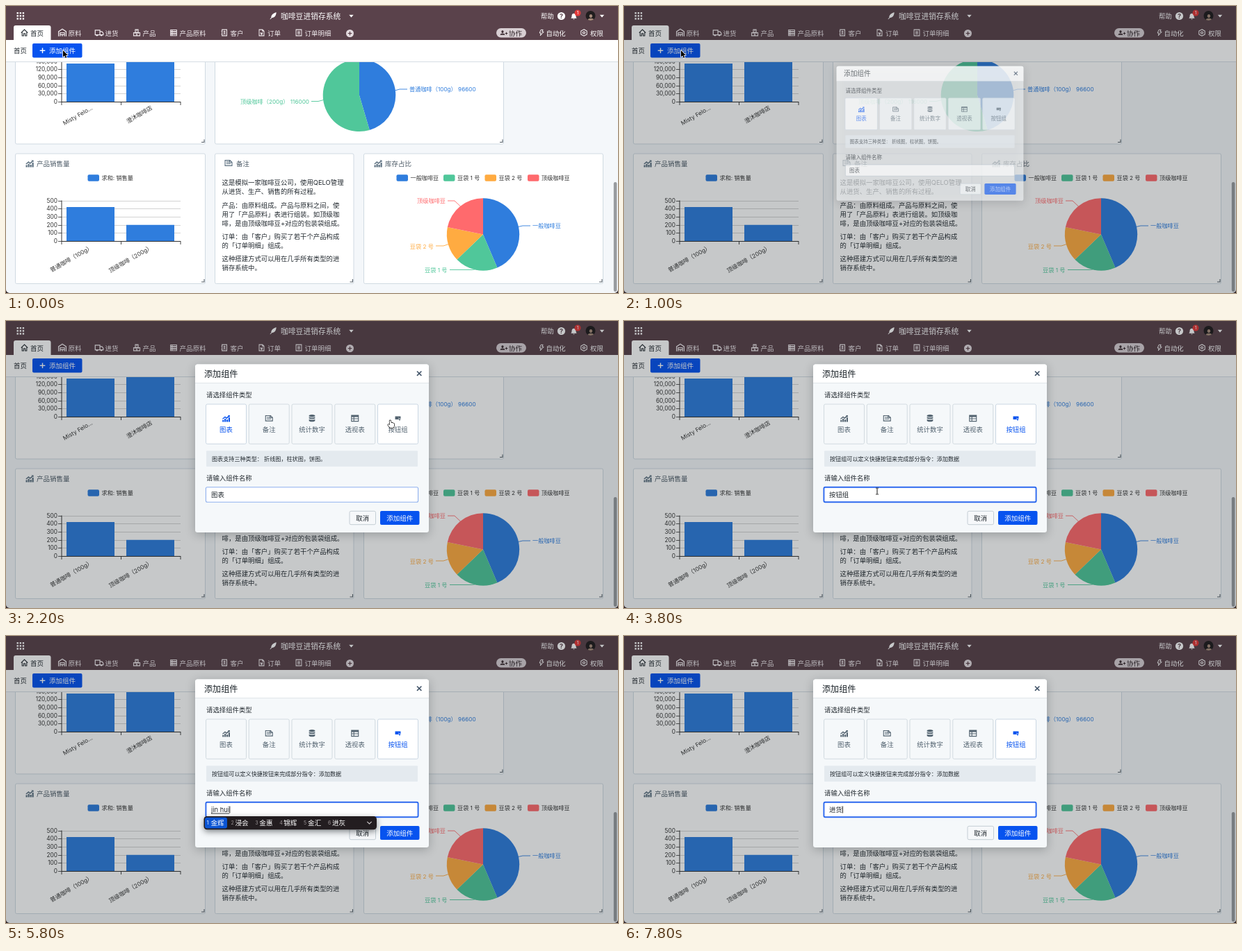
Recreate the animation shown at these times as an HTML page with a canvas. Size 880 by 414 pixels, loop 8000 ms.

```html
<!DOCTYPE html>
<html lang="zh-CN">
<head>
<meta charset="utf-8">
<title>添加组件</title>
<style>
html, body { margin: 0; width: 100%; height: 100%; overflow: hidden; background: #f4f7fa; }
canvas { display: block; width: 880px; height: 414px; }
</style>
</head>
<body>
<canvas id="stage"></canvas>
<script>
const W = 880, H = 414, LOOP = 8000, STEP = 200;
const canvas = document.getElementById('stage');
const c = canvas.getContext('2d');
const dpr = window.devicePixelRatio || 1;
canvas.width = W * dpr;
canvas.height = H * dpr;

const FONT = 'Inter, "Noto Sans CJK SC", "Noto Sans CJK", sans-serif';
const BLUE = '#2f7ddd', GREEN = '#50c79a', ORANGE = '#ffab41', RED = '#ff6a6d';
const PRIMARY = '#0753ef', INK = '#22292f', GRAY = '#5c7080', LINE = '#d0dae2';

// Icons live on a 12 x 12 grid.
const ICON = {
  home: 'M.8 6.2 6 1.2 11.2 6.2M2.4 5.2V11H4.8V7.4H7.2V11H9.6V5.2',
  store: 'M.8 11V4.5L6 1 11.2 4.5V11M3 11V6H9V11M3 8.5H9M6 8.5V11',
  truck: 'M.5 2.5H7V9H.5ZM7 4.5H9.8L11.6 6.6V9H7M2 9.2A1 1 0 1 0 4 9.2M8 9.2A1 1 0 1 0 10 9.2',
  boxes: 'M3.6 1H8.4V5.4H3.6ZM.8 6H5.8V11H.8ZM6.2 6H11.2V11H6.2ZM6 1V3M3.3 6V8M8.7 6V8',
  rows: 'M1 1.5H11V4H1ZM1 4.9H11V7.4H1ZM1 8.3H11V10.8H1ZM3.5 1.5V10.8',
  contact: 'M2.2 1H10V11H2.2ZM1 3.5H3M1 8.5H3M4.5 8.8Q6.2 6 7.9 8.8M5 4.6A1.2 1.2 0 1 0 7.4 4.6A1.2 1.2 0 1 0 5 4.6',
  order: 'M2 1H7.5L10 3.5V11H2ZM7.5 1V3.5H10M4 5.5 6 7.2 8 5.5M6 7V9.8M4 8H8',
  list: 'M1.5 1H10.5V11H1.5ZM3.8 4H8.2M3.8 6H8.2M3.8 8H8.2',
  bolt: 'M5 1H8.6L6.8 4.6H9.8L4 11 5.2 6.6H2.6Z',
  gear: 'M6 .6 10.8 3.3V8.7L6 11.4 1.2 8.7V3.3ZM4.2 6A1.8 1.8 0 1 0 7.8 6A1.8 1.8 0 1 0 4.2 6',
  leaf: 'M1 11.4 3.2 8.6C2.7 5.8 5.6 2.2 11 .6 11.2 4.8 8.8 9.2 4.3 9.4L1.7 11.8Z',
  bell: 'M1.5 9Q2.8 8 2.8 5Q2.8 1.8 6 1.4Q9.2 1.8 9.2 5Q9.2 8 10.5 9ZM4.6 9.8H7.4Q6 12 4.6 9.8Z',
  person: 'M6 1A2.4 2.8 0 1 1 5.9 1ZM1 11Q1 7.4 6 7.4Q11 7.4 11 11Z',
  chart: 'M.5 11.5V8.5H2.7V11.5ZM3.5 11.5V6.8H5.7V11.5ZM6.5 11.5V8H8.7V11.5ZM9.5 11.5V5H11.7V11.5ZM.4 6.4 4.4 3 6.7 5 9.4 2.4 8.4 1.4H11.6V4.5L10.5 3.5 6.8 7 4.4 4.9 1.2 7.5Z',
  note: 'M.8 2H8.2L11.2 5V10H.8ZM2.6 4.6H7M2.6 7H9M7.6 2V5.2H11',
  stack: 'M1.5 1.5Q6-.5 10.5 1.5V3Q6 5 1.5 3ZM1.5 4.2Q6 6 10.5 4.2V6.2Q6 8 1.5 6.2ZM1.5 7.4Q6 9.2 10.5 7.4V10Q6 12.5 1.5 10Z',
  table: 'M.8 1.5H11.2V10.5H.8ZM.8 2.5H11.2M.8 3.5H11.2M.8 6.8H11.2M4.4 4V10.5',
  button: 'M1 2.5H11V7.6L7 5 7.6 8H1ZM7.6 5.8 11.3 9.2 9.5 9.4 8.4 10.8Z'
};
for (const key in ICON) ICON[key] = new Path2D(ICON[key]);

function text(s, x, y, size, color = INK, align = 'left', weight = 400) {
  c.font = `${weight} ${size}px ${FONT}`;
  c.textAlign = align;
  c.fillStyle = color;
  c.fillText(s, x, y + size * 0.375);
}
function rect(x, y, w, h, fill, r = 0, stroke, lw = 1) {
  c.beginPath();
  c.roundRect(x, y, w, h, r);
  if (fill) { c.fillStyle = fill; c.fill(); }
  if (stroke) { c.strokeStyle = stroke; c.lineWidth = lw; c.stroke(); }
}
function floating(blur, alpha, ...box) {
  c.save();
  c.shadowColor = `rgba(16,22,26,${alpha})`;
  c.shadowBlur = blur * dpr;
  c.shadowOffsetY = 3 * dpr;
  rect(...box);
  c.restore();
}
function circle(x, y, r, fill) {
  c.beginPath();
  c.arc(x, y, r, 0, Math.PI * 2);
  c.fillStyle = fill;
  c.fill();
}
function line(points, color, lw = 1) {
  c.beginPath();
  for (let i = 0; i < points.length; i += 2) c.lineTo(points[i], points[i + 1]);
  c.strokeStyle = color;
  c.lineWidth = lw;
  c.stroke();
}
function icon(name, x, y, size, color, solid) {
  c.save();
  c.translate(x - size / 2, y - size / 2);
  c.scale(size / 12, size / 12);
  if (solid) { c.fillStyle = color; c.fill(ICON[name]); }
  else { c.strokeStyle = color; c.lineWidth = 1.15; c.stroke(ICON[name]); }
  c.restore();
}
function triangle(x, y, color) {
  c.beginPath();
  c.moveTo(x - 3.2, y - 1.7); c.lineTo(x + 3.2, y - 1.7); c.lineTo(x, y + 2);
  c.fillStyle = color;
  c.fill();
}
function plus(x, y, r, color, lw = 1.4) {
  line([x - r, y, x + r, y], color, lw);
  line([x, y - r, x, y + r], color, lw);
}

function header() {
  rect(0, 0, W, 49, '#5a424b');
  const pale = '#f1ebee';
  for (let i = 0; i < 9; i++) rect(15.5 + i % 3 * 4.1, 9 + Math.floor(i / 3) * 4.1, 2.4, 2.4, '#fff');
  icon('leaf', 384, 14, 11, '#fff', true);
  text('咖啡豆进销存系统', 395, 14.5, 10.8, '#fff');
  triangle(496.5, 14.5, '#fff');
  text('帮助', 769, 14.5, 9.4, '#fff');
  circle(798.5, 14.5, 5.6, '#fff');
  text('?', 798.5, 14.6, 9, '#5a424b', 'center', 700);
  icon('bell', 816.5, 15, 11, '#fff', true);
  circle(822, 10, 4.5, '#e23a3a');
  text('1', 822, 10, 6.5, '#fff', 'center');
  circle(840.5, 14, 7, '#201d1e');
  c.save();
  c.beginPath();
  c.arc(840.5, 14, 7, 0, 7);
  c.clip();
  icon('person', 841, 16.5, 11, '#a58a7a', true);
  c.restore();
  triangle(857, 14.5, '#fff');

  rect(11, 28, 53.5, 22, '#fff', [3, 3, 0, 0]);
  icon('home', 26.5, 38.5, 11, INK);
  text('首页', 35, 39, 9.5);
  const tabs = [['store', 81, '原料'], ['truck', 134, '进货'], ['boxes', 188, '产品'], ['rows', 241, '产品原料'],
    ['contact', 314, '客户'], ['order', 367.5, '订单'], ['list', 421, '订单明细']];
  for (const [name, x, label] of tabs) {
    icon(name, x, 38.5, name === 'store' || name === 'truck' ? 12.5 : 10.5, pale);
    text(label, x + 8.5, 39, 9.5, pale);
  }
  circle(494.5, 39.5, 5.5, '#e4dce0');
  plus(494.5, 39.5, 2.8, '#5a424b', 1.2);
  rect(705, 32, 43, 13.5, '#d8cfd3', 6.7);
  icon('person', 714, 38.5, 8, '#3b2c32', true);
  plus(719.5, 39.5, 1.8, '#3b2c32', 1);
  text('协作', 723, 39, 9.5, '#33282d');
  icon('bolt', 770, 38.5, 10, '#fff');
  text('自动化', 776.5, 39, 9.4, '#fff');
  icon('gear', 831, 38.5, 10.5, '#fff');
  text('权限', 840, 39, 9.4, '#fff');
}

function toolbar(color) {
  rect(0, 49, W, 31, '#fff');
  rect(0, 80, W, 1, '#d5dde4');
  text('首页', 11, 64.5, 9.4);
  rect(38, 54, 71.5, 20.5, color, 2);
  plus(52.5, 64.3, 3.8, '#fff');
  text('添加组件', 62, 64.5, 9.5, '#fff');
}

function panel(x, y, w, h) {
  rect(x + 0.5, y + 0.5, w - 1, h - 1, '#fff', 2, LINE);
  const r = x + w - 2, b = y + h - 3;
  line([r - 4, b, r, b, r, b - 4], '#56606a', 1.1);
}

function bars(base, gap, labels, tops, names) {
  labels.forEach((s, i) => {
    const y = Math.round(base - i * gap) + 0.5;
    text(s, 74, y - 0.3, 8.3, '#333', 'right');
    line([75, y, 80, y], '#333', 0.8);
    if (i) line([80, y, 251, y], '#c8c8c8', 0.8);
  });
  [87, 173].forEach((x, i) => rect(x, tops[i], 69, base - tops[i], BLUE));
  line([80, base + 0.5, 251, base + 0.5], '#333', 1);
  line([80, base - gap * (labels.length - 1), 80, base], '#333', 1);
  [80, 165.5, 251].forEach(x => line([x, base, x, base + 5], '#333', 0.9));
  names.forEach((s, i) => {
    c.save();
    c.translate(123.5 + i * 86, base + 8);
    c.rotate(-Math.PI / 6);
    text(s, 0, 0, 8.3, '#333', 'right');
    c.restore();
  });
}

// Each slice: [end angle in degrees clockwise from the top, colour].
function pie(x, y, r, slices) {
  let from = 0;
  for (const [to, color] of slices) {
    c.beginPath();
    c.moveTo(x, y);
    c.arc(x, y, r, (from - 90) * Math.PI / 180, (to - 90) * Math.PI / 180);
    c.fillStyle = color;
    c.fill();
    from = to;
  }
}
function callout(s, x, y, color, align, points) {
  line(points, color, 0.9);
  text(s, x, y, 8.2, color, align);
}
function legend(s, x, y, color) {
  rect(x, y - 4.8, 16.5, 9.6, color, 2);
  text(s, x + 20, y + 0.3, 8.15, '#333');
}

const NOTES = [
  [254.5, '这是模拟一家咖啡豆公司，使用QELO管理'],
  [267.5, '从进货、生产、销售的所有过程。'],
  [287, '产品：由原料组成。产品与原料之间，使'],
  [300, '用了「产品原料」表进行组装。如顶级咖'],
  [313, '啡，是由顶级咖啡豆+对应的包装袋组成。'],
  [332, '订单：由「客户」购买了若干个产品构成'],
  [345, '的「订单明细」组成。'],
  [364.5, '这种搭建方式可以用在几乎所有类型的进'],
  [377.5, '销存系统中。']
];

function dashboard() {
  rect(0, 0, W, H, '#f4f7fa');
  panel(13, 40, 274, 159.5);
  bars(138, 11.7, ['0', '30,000', '60,000', '90,000', '120,000', '150,000'], [83, 80], ['Misty Felo...', '澄沐咖啡店']);
  panel(300, 40, 416, 159.5);
  pie(508, 128.8, 52.3, [[163.6, BLUE], [360, GREEN]]);
  callout('普通咖啡（100g） 96600', 580, 120, BLUE, 'left', [559, 122, 566, 120, 577, 120]);
  callout('顶级咖啡（200g） 116000', 436, 138, GREEN, 'right', [439, 137.5, 449, 137.5, 456.5, 135.5]);

  panel(13, 212.5, 274, 188.5);
  icon('chart', 34, 227, 12, GRAY, true);
  text('产品销售量', 44, 227, 9.5, '#4d5b67');
  legend('求和: 销售量', 117.5, 248, BLUE);
  bars(339, 11.7, ['0', '100', '200', '300', '400', '500'], [290, 315.7], ['普通咖啡（100g）', '顶级咖啡（200g）']);

  panel(300, 212.5, 200.5, 188.5);
  icon('note', 320, 226.5, 11.5, GRAY);
  text('备注', 331, 227, 9.4, '#4d5b67');
  for (const [y, s] of NOTES) text(s, 310.5, y, 9.4);

  panel(514, 212.5, 345, 188.5);
  icon('chart', 535, 227, 12, GRAY, true);
  text('库存占比', 545, 227, 9.5, '#4d5b67');
  legend('一般咖啡豆', 561.5, 248, BLUE);
  legend('豆袋 1 号', 629, 248, GREEN);
  legend('豆袋 2 号', 688.5, 248, ORANGE);
  legend('顶级咖啡豆', 750, 248, RED);
  pie(686, 329.5, 52.2, [[157, BLUE], [226, GREEN], [281.5, ORANGE], [360, RED]]);
  callout('一般咖啡豆', 757, 317, BLUE, 'left', [736.5, 318.5, 743, 317, 754, 317]);
  callout('顶级咖啡豆', 632, 281, RED, 'right', [635, 281, 645, 281, 653.5, 289]);
  callout('豆袋 2 号', 615, 346.5, ORANGE, 'right', [618, 346, 629, 346, 636.5, 343.5]);
  callout('豆袋 1 号', 634.5, 380.5, GREEN, 'right', [638, 380.5, 669, 380.5, 674, 380]);
  rect(873.8, 254, 4.6, 158, '#989b9f', 2.3);
}

const TYPES = [['chart', '图表', true], ['note', '备注'], ['stack', '统计数字', true], ['table', '透视表'], ['button', '按钮组', true]];

function modal(s) {
  floating(14, 0.25, 272, 62.5, 336, 242.5, '#f5f8fa', 3.5);
  rect(272, 62.5, 336, 27, '#fff', [3.5, 3.5, 0, 0]);
  rect(272, 89.3, 336, 0.8, '#d8dfe5');
  text('添加组件', 285, 76.3, 12.1, '#182026', 'left', 500);
  line([591, 72.5, 597.4, 78.9], '#44566a', 1.6);
  line([597.4, 72.5, 591, 78.9], '#44566a', 1.6);
  text('请选择组件类型', 288, 106.5, 9.4);
  TYPES.forEach(([name, label, solid], i) => {
    const x = 287.5 + i * 61.75, on = i === s.selected, color = on ? PRIMARY : '#52626f';
    rect(x, 120, 58, 57.3, on || i === s.hover ? '#fff' : '#f5f8fa', 2, on || i === s.hover ? '#c6d3e0' : '#cfd7dd', 0.9);
    icon(name, x + 29, 140.3, name === 'button' ? 9.5 : 11.5, color, solid);
    text(label, x + 29, 156.8, 9.4, color, 'center');
  });
  rect(288, 187.3, 304, 22.8, '#e4eaef', 1);
  text(s.selected ? '按钮组可以定义快捷按钮来完成部分指令：添加数据' : '图表支持三种类型： 折线图，柱状图，饼图。', 296, 199, 8.1);
  text('请输入组件名称', 288, 226.8, 9.4);
  const ring = [['#b4c0ca', 1], ['#8fb0ee', 1.1], ['#2c68ee', 1.9]][s.focus];
  const grow = s.focus ? 0.6 : 0;
  rect(288 - grow, 240.3 - grow, 304 + 2 * grow, 20.4 + 2 * grow, '#fff', 2, ...ring);
  text(s.value, 295, 250.7, 9.4);
  const end = 295 + c.measureText(s.value).width;
  if (s.words) line([295, 256, end, 256], INK, 0.9);
  if (s.caret) line([end + 0.7, 245.5, end + 0.7, 255.5], '#111', 0.9);
  rect(494, 274.3, 37.5, 19.4, '#f6f8fa', 2, '#bfc9d1', 0.9);
  text('取消', 512.7, 284.3, 9.4, INK, 'center');
  rect(538, 274, 56.5, 20, PRIMARY, 2);
  text('添加组件', 566.3, 284.3, 9.5, '#fff', 'center');
}

function candidates(words) {
  floating(9, 0.5, 284.5, 260, 248.5, 19.3, '#231d20', 4.5);
  rect(286, 261.8, 32, 15.6, '#0b55d4', 3);
  words.split(' ').forEach((word, i) => {
    const x = 288.5 + i * 34.9;
    text(i + 1, x, 269.8, 7, i ? '#9b9496' : '#fff');
    text(word, x + 6, 269.5, 9.6, '#fff');
  });
  line([519.3, 267.8, 522.5, 271, 525.7, 267.8], '#c9c4c6', 1.2);
}

const ARROW = new Path2D('M0 0V9.6L2.2 7.6 3.7 11 5.3 10.3 3.8 7H6.8Z');
const HAND = new Path2D('M-1.5-4.2Q-.6-5.4.3-4.2L1 -1Q2-1.8 2.6-.7 3.6-1.3 4.2-.1 5.2-.3 5.4.8L5 3.8 4 6H-.8L-3.8 2.2Q-4 .9-2.7 1.1L-1.3 2.2Z');
function cursor({ x, y, kind }) {
  c.save();
  c.translate(x, y);
  if (kind === 'beam') {
    line([-2, -4.5, -0.6, -4.5, 0, -4, 0.6, -4.5, 2, -4.5], '#111', 0.9);
    line([-2, 4.5, -0.6, 4.5, 0, 4, 0.6, 4.5, 2, 4.5], '#111', 0.9);
    line([0, -4, 0, 4], '#111', 1);
  } else {
    const hand = kind === 'hand', shape = hand ? HAND : ARROW;
    c.fillStyle = hand ? '#fff' : '#000';
    c.strokeStyle = hand ? '#000' : '#fff';
    c.lineWidth = hand ? 1.3 : 1.6;
    c.lineJoin = 'round';
    c.stroke(shape);
    c.fill(shape);
  }
  c.restore();
}

const TYPING = [
  [0, '图表'], [2600, '按钮组'], [4200, '按钮'], [4400, '按'], [4600, ''],
  [5000, 'j', '就 级 及 将 家 进'], [5200, 'ji', '级 及 几 机 计 记'], [5400, 'jin', '进 金 近 仅 今 尽'],
  [5600, 'jin hu', '进户 金湖 进护 金虎 近乎 锦湖'],
  [5800, 'jin hui', '金辉 浸会 金惠 锦辉 金汇 进灰'],
  [6400, 'jin hu', '进户 金湖 进护 金虎 近乎 锦湖'],
  [6600, 'jin huo', '进货 近火 金火 进获 尽获 进伙'],
  [7200, '进货']
];

const ease = p => (p = Math.min(1, Math.max(0, p)), p * p * (3 - 2 * p));
const mix = (a, b, p) => a + (b - a) * p;

function pointer(t) {
  if (t >= 4200) return null;
  if (t < 2600) {
    const p = ease((t - 1200) / 800);
    return { x: mix(82, 553, p), y: mix(64, 148, p), kind: p > 0.95 ? 'hand' : 'arrow' };
  }
  const p = ease((t - 2600) / 1000);
  const y = mix(148, 245.5, p);
  return { x: mix(553, 364, p), y, kind: y > 240 ? 'beam' : y < 178 ? 'hand' : 'arrow' };
}

function draw(t) {
  c.setTransform(dpr, 0, 0, dpr, 0, 0);
  dashboard();
  toolbar(t === 800 ? '#0646d4' : PRIMARY);
  header();
  if (t >= 1000) {
    rect(0, 0, W, H, 'rgba(16,22,28,.235)');
    const [, value, words] = TYPING.filter(k => k[0] <= t).pop();
    const state = {
      value, words,
      selected: t >= 2600 ? 4 : 0,
      hover: t >= 2000 && t < 2600 ? 4 : -1,
      focus: t >= 3600 ? 2 : t >= 1400 && t < 2600 ? 1 : 0,
      caret: t >= 4000 || (t >= 1200 && t < 1600)
    };
    c.save();
    if (t < 1200) {
      c.globalAlpha = 0.62;
      c.translate(440, 183.5);
      c.scale(0.8, 0.8);
      c.translate(-440, -183.5);
    }
    modal(state);
    c.restore();
    if (words) candidates(words);
  }
  const p = pointer(t);
  if (p) cursor(p);
  // Rounded lower window corners.
  c.beginPath();
  c.rect(0, H - 6, W, 6);
  c.roundRect(0, H - 20, W, 20, [0, 0, 5, 5]);
  c.save();
  c.clip('evenodd');
  rect(0, H - 6, W, 6, '#2a2025');
  c.restore();
}

const start = performance.now();
function frame() {
  const t = (performance.now() - start) % LOOP;
  draw(Math.floor(t / STEP) * STEP);
  requestAnimationFrame(frame);
}
frame();
</script>
</body>
</html>
```
